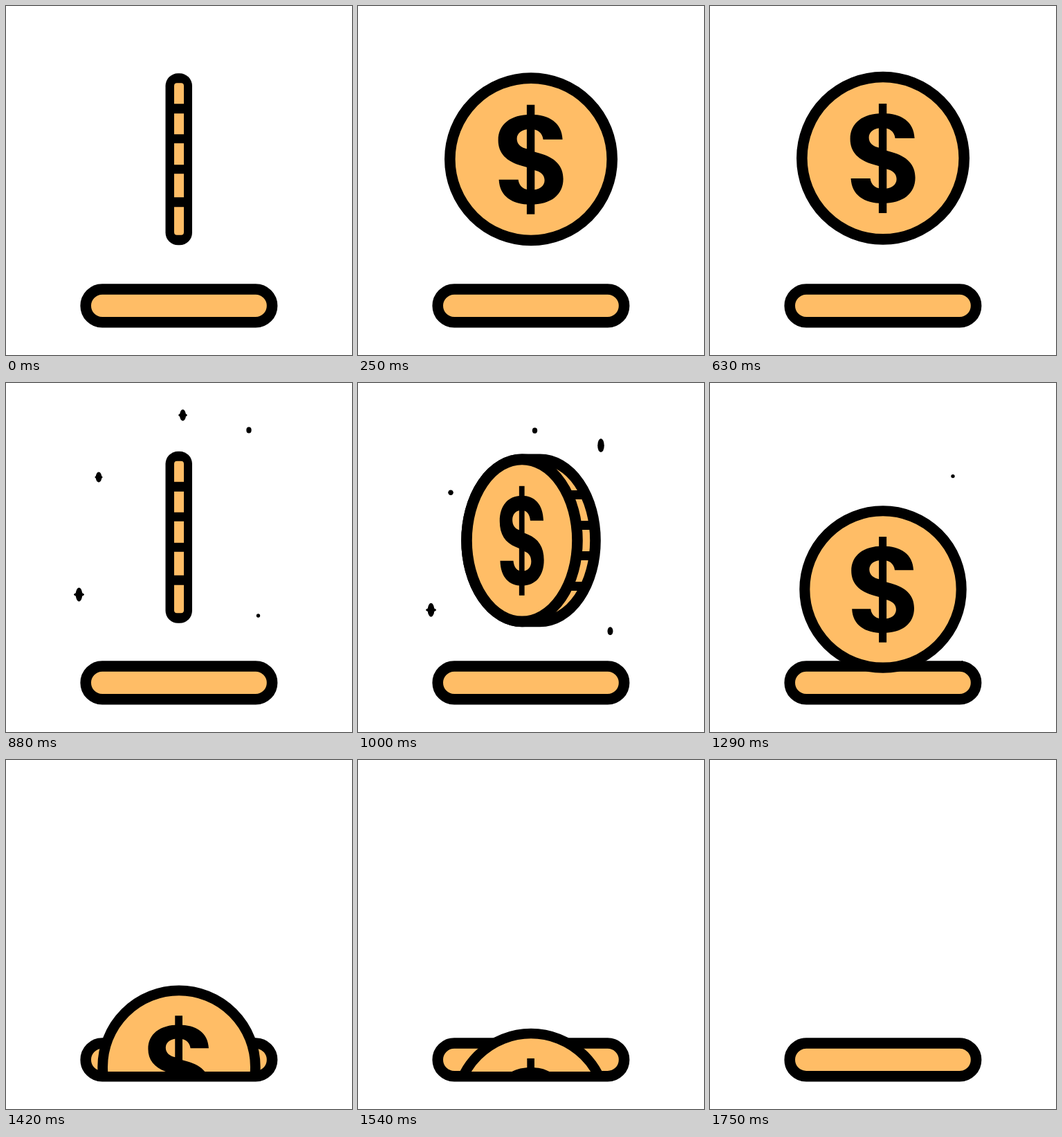
An HTML page for the animation above (1960 ms loop, 500 by 504 pixels).

```html
<!DOCTYPE html>
<html lang="en">
<head>
<meta charset="utf-8">
<title>Coin drop</title>
<style>
  html, body { margin: 0; width: 100%; height: 100%; overflow: hidden; background: #fff; }
  svg { display: block; width: 500px; height: 504px; }
  .line { fill: #ffbd66; stroke: #000; stroke-width: 15.6; }
</style>
</head>
<body>
<svg viewBox="0 0 500 504">
  <defs>
    <clipPath id="slotClip"><rect width="500" height="450"/></clipPath>
    <g id="dollar" transform="translate(-.4 .4)">
      <path id="hook" d="M46-29H18C17-39 9-44 0-44C-13-44-20-38-20-30C-20-22-14-17-4-15L1-13V13L-13 9C-35 3-47-9-47-28C-47-51-29-65 0-65C27-65 45-53 46-29Z"/>
      <use href="#hook" transform="rotate(180)"/>
      <rect x="-5.7" y="-79" width="11.4" height="158"/>
    </g>
  </defs>
  <g id="sparks"></g>
  <rect class="line" x="115.2" y="409" width="269.4" height="47.8" rx="23.9"/>
  <g clip-path="url(#slotClip)">
    <g id="coin">
      <g id="face">
        <circle class="line" r="117.2"/>
        <use href="#dollar"/>
      </g>
      <g id="turned">
        <path class="line" d="M-13-117H13A80 117 0 0 1 13 117H-13A80 117 0 0 1-13-117Z"/>
        <path d="M66-22h26M66 22h26M53-66h26M53 66h26" stroke="#000" stroke-width="13"/>
        <ellipse class="line" cx="-13" rx="80" ry="117"/>
        <use href="#dollar" transform="translate(-13) scale(.68 1)"/>
      </g>
      <g id="edge">
        <rect x="-19.5" y="-124" width="38.5" height="248" rx="18"/>
        <rect x="-7" y="-110" width="14" height="219.5" rx="4" fill="#ffbd66"/>
        <path d="M0-80v14M0-36v13M0 8v13M0 55v14" stroke="#000" stroke-width="16"/>
      </g>
    </g>
  </g>
</svg>
<script>
const LOOP = 1960, FPS = 24, JUMP = 14;
const $ = id => document.getElementById(id);

// Frames n are counted from the start of the jump: a small hop, then a soft S-shaped fall.
const hop = n => n > 0 && n < 7 ? -4 * Math.sin(Math.PI * n / 7) : 0;
const fall = n => 345 / (1 + Math.exp((18.72 - n) / 2.17));
const size = n => 1 - .0061 * Math.max(0, n - 10.4);

// x, y at the middle of the spin, full half-height, peak frame
const SPARKS = [
  [255.5, 46.5, 9, 6.5],
  [134, 136, 8, 6.5],
  [105.5, 305.5, 13, 8.5],
  [351, 68, 11.7, 11],
  [364.5, 336, 7, 11]
];

// The coin steps through a new side every three frames while it turns.
function pose(n) {
  const sides = n < 1 ? ['edge', 'turned'] : ['face', 'turned', 'edge', 'turned'];
  const step = Math.floor(n < 1 ? (n + JUMP) / 3 : (n - 1) / 3);
  return n < 28 ? sides[step] || 'face' : '';
}

// Early sparks are stars, late ones plain drops; all swell, shrink and sink.
function spark([x, y, full, peak], n) {
  const h = full * (1 - Math.abs(n - peak) / 6.5);
  if (n < 5 || h < 1) return '';
  const cy = y + 7.4 * (n - 7);
  const w = Math.min(h, .2 * h + 2.8);
  const oval = (rx, ry) => `<ellipse cx="${x}" cy="${cy}" rx="${rx}" ry="${ry}"/>`;
  return oval(w, h) + (peak < 10 ? oval(Math.max(w, .75 * h), w * .6) : '');
}

function draw(time) {
  const n = Math.floor((time % LOOP) * FPS / 1000) - JUMP;
  const shown = pose(n);
  for (const id of ['face', 'turned', 'edge']) $(id).style.display = id === shown ? '' : 'none';
  $('coin').setAttribute('transform',
    `translate(250 ${221.3 + hop(n) + fall(n)}) scale(${size(n)})`);
  $('sparks').innerHTML = SPARKS.map(s => spark(s, n)).join('');
}

const start = performance.now();
function tick() {
  draw(performance.now() - start);
  requestAnimationFrame(tick);
}
tick();
</script>
</body>
</html>
```
